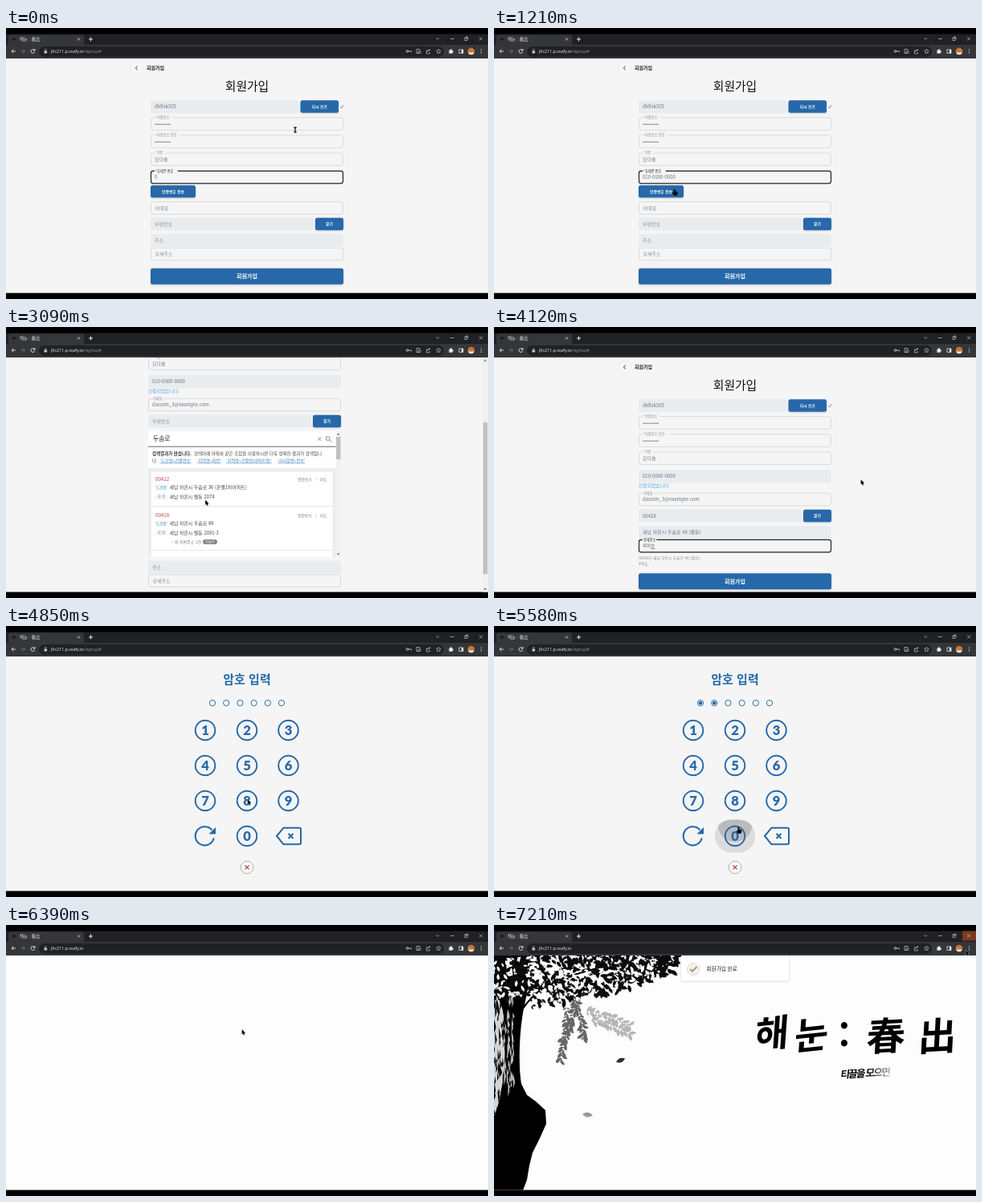
An HTML page that plays this animation: 600 by 338 pixels, repeating every 7.24 s.

```html
<!DOCTYPE html>
<html lang="ko">
<head>
<meta charset="utf-8">
<title>회원가입</title>
<style>
html, body { margin: 0; width: 100%; height: 100%; overflow: hidden; background: #000; }
svg { display: block; width: 100%; height: 100%; font-family: "Noto Sans CJK KR", "Noto Sans CJK", "Noto Sans", sans-serif; }
text { white-space: pre; }
.latin { font-family: "Noto Sans", sans-serif; }
.key { font-family: Lato, sans-serif; font-weight: 900; }
</style>
</head>
<body>
<svg id="stage" viewBox="0 0 600 338">
  <defs>
    <clipPath id="view"><rect y="38" width="600" height="292.5"/></clipPath>
    <clipPath id="listClip"><rect x="177" y="130" width="240" height="157"/></clipPath>
    <clipPath id="keyClip"><rect id="keyShape" width="50" height="41" rx="20"/></clipPath>
    <clipPath id="trunkClip"><path id="trunkShape"/></clipPath>
    <linearGradient id="titleInk" gradientUnits="userSpaceOnUse"><stop/><stop offset="1" stop-opacity="0"/></linearGradient>
    <linearGradient id="lineInk" gradientUnits="userSpaceOnUse"><stop/><stop offset="1" stop-opacity="0"/></linearGradient>
    <filter id="shadow" x="-10%" y="-30%" width="120%" height="170%"><feDropShadow dx="0" dy=".7" stdDeviation=".8" flood-opacity=".2"/></filter>
  </defs>
  <rect width="600" height="338"/>
  <g clip-path="url(#view)">
    <rect id="paper" y="37" width="600" height="295"/>
    <g id="page"></g>
    <g id="landing"></g>
  </g>
  <g id="chrome"></g>
  <g id="cursor"></g>
</svg>
<script>
const LOOP = 7240;
const BLUE = '#2568a9', INK = '#6d7378', PALE = '#8d9398';
const USER = {
  id: 'dkflsk305', name: '모다솔', phone: '010-0000-0000', mail: 'dasolm_3@example.com',
  zip: '00418', road: '두솜로', address: '새남 하온시 두솜로 48 (별동)'
};
const SITE = ['해', '눈', ':', '春', '出'];
const $ = id => document.getElementById(id);
const clamp = v => Math.max(0, Math.min(1, v));
const span = (t, a, b) => clamp((t - a) / (b - a));
const ease = p => p * p * (3 - 2 * p);
const typed = (s, t, a, b) => s.slice(0, Math.floor(span(t, a, b) * s.length));

const text = (x, y, s, size, fill = INK, more = '') =>
  `<text x="${x}" y="${y}" font-size="${size}" fill="${fill}" ${more}>${s}</text>`;
const box = (x, y, w, h, fill, r = 0, more = '') =>
  `<rect x="${x}" y="${y}" width="${w}" height="${h}" rx="${r}" fill="${fill}" ${more}/>`;
const line = (d, stroke, width = 1, more = '') =>
  `<path d="${d}" fill="none" stroke="${stroke}" stroke-width="${width}" ${more}/>`;
const disc = (x, y, r, fill, more = '') => `<circle cx="${x}" cy="${y}" r="${r}" fill="${fill}" ${more}/>`;
const MID = 'text-anchor="middle"', BOLD = 'font-weight="700"', MEDIUM = 'font-weight="500"', THIN = 'font-weight="300"';

const shown = {};
function paint(id, markup) {
  if (shown[id] !== markup) $(id).innerHTML = shown[id] = markup;
}

// ---- browser frame ----
function chrome(path, closing) {
  const grey = '#c4c7ca', white = '#e8eaed';
  return box(0, 7.5, 600, 14, '#202124')
    + '<path d="M1 21.5q2 0 2-2v-8q0-3 3-3h88q3 0 3 3v8q0 2 2 2z" fill="#35363a"/>'
    + box(0, 21, 600, 17, '#35363a')
    + box(8, 12.5, 4, 3, '#1b1b1d')
    + text(17, 16.2, `${SITE[0]}${SITE[1]} : ${SITE[3]}${SITE[4]}`, 5.4, white)
    + line('M89 12.5l3 3m0-3l-3 3', grey, .8) + line('M103 14h5m-2.5-2.5v5', white, 1)
    + (closing ? box(583, 7.5, 17, 12, '#7a3a20') : '')
    + line('M535.5 12.5l1.8 1.8 1.8-1.8M553 13.5h5M589 11.5l4 4m0-4l-4 4M571 12.5h3v3h-3zM572 12v-.8h3v3', grey, .7)
    + line('M12 29H7m2.3-2.3L7 29l2.3 2.3', white, .9)
    + line('M18.5 29h5m-2.3-2.3l2.3 2.3-2.3 2.3', '#74777b', .9)
    + line('M35.5 27.8a2.4 2.4 0 1 0 .2 2M36 26v2.2h-2.2', white, .9)
    + box(41, 23, 504, 13, '#202124', 6.5)
    + box(47.5, 28.5, 3.6, 3, grey, .5) + line('M48.2 28.5v-1a1.1 1.1 0 0 1 2.2 0v1', grey, .6)
    + text(56, 31.2, `j9c211.p.ssafy.io<tspan fill="#8d9297">${path}</tspan>`, 5.3, white, 'class="latin"')
    + disc(499.5, 29, 1.3, 'none', `stroke="${grey}"`) + line('M501 29h3.4v1.5', grey, .9)
    + line('M514 31.5h-3v-5h4v2M513 29h3v2.5h-3zM526 28h-2.5v4h4v-2m-2.5-.3q0-2.4 3-2.4m-1.2-1.2l1.2 1.2-1.2 1.2', grey, .7)
    + line('M538.5 26.3l.8 1.8 2 .2-1.5 1.4.4 2-1.7-1-1.7 1 .4-2-1.5-1.4 2-.2z', grey, .7)
    + box(551.5, 27.5, 4.3, 4.3, white, .6) + disc(554, 27.3, 1.1, white) + disc(556, 29.5, 1, white)
    + line('M564 27h5v4.4h-5z', white, .8) + box(567, 27, 2, 4.4, white)
    + disc(579, 29, 4.3, '#c7763a') + '<path d="M575 30.5a4.3 4.3 0 0 0 8 0z" fill="#eee5dc"/>'
    + [26.8, 29, 31.2].map(y => disc(591.5, y, .6, white)).join('');
}

// ---- sign-up form ----
const button = (x, y, w, h, label, size = 4.8) =>
  box(x, y, w, h, BLUE, 2.5, 'filter="url(#shadow)"')
  + text(x + w / 2, y + h / 2 + size * .36, label, size, '#fff', `${MID} ${BOLD}`);
const filled = (y, s, w = 240, fill = INK) =>
  box(180, y, w, 16, '#e9ecef', 2) + text(185, y + 10.2, s, 6, fill, THIN);

function field(y, label, value, focus) {
  const out = box(180.5, y, 239, 15.5, 'none', 2.5,
    `stroke="${focus ? '#222' : '#d0d3d6'}" stroke-width="${focus ? 1.2 : .8}"`);
  if (!value && !focus) return out + text(185.5, y + 10, label, 6, PALE, THIN);
  return out + box(185, y - 2, label.length * 3.8 + 2, 4, '#f5f5f5')
    + text(186, y + 1.3, label, 4.2, focus ? '#222' : PALE)
    + text(185, y + 10, value, 6, INK, THIN);
}

function result(y, zip, road, lot) {
  const tag = (ty, s) => box(185.5, ty - 5, 15.5, 6.5, '#fafafa', .5, 'stroke="#e4e6ea" stroke-width=".4"')
    + text(193.3, ty, s, 4.6, '#3f8fd0', MID);
  return text(186, y, zip, 6.2, '#b9404e')
    + text(363, y, '영문보기', 4.8, '#777') + line(`M386.5 ${y - 4}v4`, '#bbb', .5) + text(390.5, y, '지도', 4.8, '#777')
    + tag(y + 9.5, '도로명') + text(203.5, y + 10, road, 5.9, '#444')
    + tag(y + 21.3, '지 번') + text(203.5, y + 21.8, lot, 5.9, '#444');
}

function addressSearch(t) {
  const head = box(177, 130, 240, 157, '#fff') + text(183, 142, typed(USER.road, t, 2600, 2790), 7.8, '#222', MEDIUM)
    + line('M388 137.3l4.6 4.6m0-4.6l-4.6 4.6', '#666', .7)
    + disc(400.7, 139, 2.5, 'none', 'stroke="#444" stroke-width=".6"') + line('M402.6 141l2.4 2.4', '#444', .7)
    + box(177, 148.7, 234, .9, '#555');
  if (t < 2830) return head;
  const tips = [[191.5, "'도로명+건물번호'"], [238, "'지역명+지번'"], [274, "'지역명+건물명(아파트명)'"], [338, "'사서함명+번호'"]];
  return `<g clip-path="url(#listClip)">${head}`
    + text(182, 159.8, '검색결과가 많습니다.', 5.5, '#333', BOLD)
    + text(234, 159.8, '검색어에 아래와 같은 조합을 이용하시면 더욱 정확한 결과가 검색됩니', 5.5, '#444')
    + text(182, 168.6, '다.', 5.5, '#444')
    + tips.map(([x, s]) => text(x, 168.6, s, 5.2, '#3d7fbd', 'text-decoration="underline"')).join('')
    + box(177, 176, 234, 111, '#ececec') + box(181, 180.5, 225.5, 107, '#fff')
    + result(192, '00412', `새남 하온시 ${USER.road} 36 (온별1차아파트)`, '새남 하온시 별동 2074')
    + box(181, 223, 225.5, .7, '#ddd')
    + result(237, USER.zip, `새남 하온시 ${USER.road} 48`, '새남 하온시 별동 2081-3')
    + text(203.5, 269.7, '└ 외 지번주소 1건', 5, '#777')
    + box(245, 265, 18, 6, '#888', 3) + text(254, 269.5, '더보기', 4, '#fff', MID)
    + box(181, 278, 225.5, .7, '#ddd')
    + box(410.5, 130, 6.5, 157, '#f1f1f1') + box(411, 137, 5.5, 28, '#c1c1c1')
    + '<path d="M412 134.5l1.7-2 1.7 2zM412 282.5l1.7 2 1.7-2z" fill="#555"/></g>';
}

const DETAIL_STEPS = [[3800, '4'], [3890, '40'], [3980, '408'],
  [4050, '408<tspan text-decoration="underline">ㅎ</tspan>'],
  [4100, '408<tspan text-decoration="underline">호</tspan>'], [4280, '408호']];

function form(t) {
  const verified = t >= 1480, mailFocus = t >= 1620 && t < 2330;
  const searching = t >= 2480 && t < 3400, chosen = t >= 3400;
  const scroll = searching ? 118 * ease(span(t, 2560, 2780)) : 0;
  const phone = '0' + typed(USER.phone.slice(1), t, 30, 850);
  const mailY = verified ? 207 : 216.5;
  const zipY = mailY + (!verified ? 20 : mailFocus ? 30 : 20.5);
  const addressY = zipY + (searching ? 182 : 20.5);
  const detailY = addressY + 17.3;
  const detail = DETAIL_STEPS.reduce((s, [at, v]) => t >= at ? v : s, '');
  const dots = '•'.repeat(10);

  let out = disc(162.5, 50, 8, '#f7f7f7', 'stroke="#ebebeb" stroke-width=".7"')
    + line('M163.7 47.7l-2.4 2.3 2.4 2.3', '#222', 1)
    + text(175, 52.2, '회원가입', 6, '#222', BOLD)
    + text(300, 78.3, '회원가입', 14.8, '#111', MID)
    + filled(90, USER.id, 184) + button(366.5, 90.3, 47.5, 15.4, '다시 쓰기')
    + line('M416.2 98.3l1.3 1.7 2.6-4', BLUE, .7)
    + field(111.8, '*비밀번호', dots) + field(133.8, '*비밀번호 확인', dots)
    + field(156, '*이름', USER.name);
  out += verified
    ? filled(178, USER.phone) + text(180, 200, '인증되었습니다.', 5.8, '#4fa3dc')
    : field(178.3, '*휴대폰 번호', phone, true) + button(180, 196.3, 56, 15.2, '인증번호 전송');
  out += field(mailY + .3, '이메일', typed(USER.mail, t, 1660, 2000), mailFocus)
    + filled(zipY, chosen ? USER.zip : '우편번호', 203, chosen ? INK : PALE) + button(385, zipY + .3, 35, 15.4, '찾기')
    + filled(addressY, chosen ? USER.address : '주소', 240, chosen ? INK : PALE)
    + field(detailY, '상세주소', detail, t >= 3680 && t < 4400);
  if (chosen) out += text(180, detailY + 25, `[${USER.zip}] ${USER.address},`, 4.8, PALE)
    + text(180, detailY + 31.2, detail, 4.4, PALE);
  out += button(180, detailY + (chosen ? 42 : 25.5), 240, 20, '회원가입', 7);
  if (t >= 1700 && mailFocus) out += box(182, 223.3, 148, 9, '#f9f9f9', 1, 'stroke="#e6e6e6" stroke-width=".5"')
    + text(185, 229.7, USER.mail, 5.6, '#111');
  if (!searching) return out;
  return `<g transform="translate(-3 ${-scroll})">${out}<g transform="translate(3 118)">${addressSearch(t)}</g></g>`
    + box(593, 37, 7, 295, '#f1f1f1') + box(594, 43 + scroll * .645, 5.4, 189, '#c1c1c1')
    + '<path d="M594.8 42.5l1.7-2 1.7 2zM594.8 326l1.7 2 1.7-2z" fill="#555"/>';
}

// ---- passcode pad ----
const COLS = [248, 300, 351.5], ROWS = [130, 174, 218, 262];
// time, column, row
const PRESSES = [[5280, 2, 1], [5550, 1, 3], [5680, 1, 2], [5780, 0, 0], [5880, 2, 0], [5970, 1, 0]];

function keypad(t) {
  let out = text(300, 71.8, '암호 입력', 15, BLUE, `${MID} ${BOLD}`);
  const count = PRESSES.filter(p => t >= p[0]).length;
  for (let i = 0; i < 6; i++) {
    const x = 257 + i * 17.2;
    out += disc(x, 96, 3.6, '#fff', `stroke="${BLUE}" stroke-width="1"`) + (i < count ? disc(x, 96, 2.3, BLUE) : '');
  }
  const press = PRESSES.filter(p => t >= p[0] - 40 && t < p[0] + 170).pop();
  if (press) {
    const x = COLS[press[1]], y = ROWS[press[2]], age = t - press[0];
    $('keyShape').setAttribute('x', x - 25);
    $('keyShape').setAttribute('y', y - 20.5);
    out += box(x - 25, y - 20.5, 50, 41, '#dcdcdc', 20);
    if (age > 0) out += disc(x, y - 14, 15 + age * .2, '#000',
      `opacity="${.15 * (1 - span(age, 80, 170))}" clip-path="url(#keyClip)"`);
  }
  for (let n = 1; n <= 10; n++) {
    const x = n > 9 ? 300 : COLS[(n - 1) % 3], y = ROWS[Math.floor((n - 1) / 3)];
    out += disc(x, y, 12.3, 'none', `stroke="${BLUE}" stroke-width="1.9"`)
      + text(x, y + 5.8, n % 10, 16.5, BLUE, `${MID} class="key"`);
  }
  return out + line('M256.5 254.5a11.7 11.7 0 1 0 2.3 10', BLUE, 2)
    + `<path d="M252.5 259.5h8.5v-8.5z" fill="${BLUE}"/>`
    + line('M337 262l8.5-10.3h19.5q2 0 2 2v16.6q0 2-2 2h-19.5z', BLUE, 2, 'stroke-linejoin="round"')
    + line('M351.5 259l6 6m0-6l-6 6', BLUE, 2)
    + disc(300, 301, 7.8, '#f8f8f8', 'stroke="#aaa" stroke-width=".9"')
    + line('M297.5 298.5l5 5m0-5l-5 5', '#c0453a', 1.1);
}

// ---- landing page ----
let seed = 17;
const rnd = () => (seed = (seed * 16807) % 2147483647) / 2147483647;
const leaf = (x, y, a, s) => {
  const c = Math.cos(a) * s, d = Math.sin(a) * s;
  const at = (u, v) => `${(x + u * c - v * d).toFixed(1)} ${(y + u * d + v * c).toFixed(1)}`;
  return `M${at(0, 0)}Q${at(.5, .45)} ${at(1, 0)}Q${at(.5, -.45)} ${at(0, 0)}`;
};

function spray(x, y, angle, length, bend) {
  let d = '';
  for (let i = 0; i < length; i += 3.5) {
    x += Math.cos(angle) * 3.5;
    y += Math.sin(angle) * 3.5;
    angle += bend;
    for (const side of [-1, 1]) d += leaf(x, y, angle + side * (.4 + rnd() * .8), 4 + rnd() * 6);
  }
  return d;
}

// leaves scattered under a canopy edge that rises towards the right
function scatter(count, reach, falloff, size) {
  let d = '';
  for (let i = 0; i < count; i++) {
    const x = reach * Math.pow(rnd(), 1.2);
    const depth = 76 * Math.pow(1 - x / 240, .5) * (x < 45 ? .75 : 1);
    d += leaf(x, 34 + depth * Math.pow(rnd(), falloff), rnd() * 2.6 - .3, size * (.6 + rnd() * .8));
  }
  return d;
}

// short vertical slivers for the bark
function slivers(count, left, width, top, height) {
  let d = '';
  for (let i = 0; i < count; i++) {
    const x = left + rnd() * width, y = top + rnd() * height, h = 4 + rnd() * 9;
    d += `M${x.toFixed(1)} ${y.toFixed(1)}l${(1 + rnd() * 2).toFixed(1)} ${h.toFixed(1)}l-2 ${(h * .6).toFixed(1)}z`;
  }
  return d;
}

function tree() {
  const trunk = 'M0 38H40L42 78Q40 92 37 104Q33 125 32 150Q31 180 34 198L41 212L52 220L64 231L65 248L57 266L48 284L44 300L41 318L36 331H0Z';
  $('trunkShape').setAttribute('d', trunk);
  const hanging = spray(104, 95, 1.9, 74, -.004) + spray(90, 100, 1.5, 45, .03) + spray(98, 90, 1.1, 50, .03);
  const faint = spray(112, 108, .1, 58, .025) + spray(118, 118, .2, 50, .02);
  return `<path d="${trunk}"/><g clip-path="url(#trunkClip)">`
    + '<path d="M0 84Q15 100 13 140Q15 180 9 205Q6 226 0 238Z" fill="#d4d4d4"/>'
    + `<path d="${slivers(55, -2, 16, 80, 150)}"/><path d="${slivers(45, 12, 12, 70, 130)}" fill="#bbb"/></g>`
    + line('M36 104Q56 76 84 67T150 48M70 71Q60 55 46 38M96 62Q118 70 138 82', '#000', 2.2)
    + `<path d="${scatter(760, 225, 1.1, 8)}" fill="#0c0c0c"/><path d="${scatter(230, 200, .9, 6)}" fill="#fdfdfe"/>`
    + `<path d="${hanging}" fill="#666"/><path d="${faint}" fill="#b5b5b5"/>`;
}

function buildLanding() {
  // centre, baseline, size, tilt, slant
  const glyphs = [[345, 152, 46, -6, -10], [394, 154, 46, -6, -10], [436, 154, 44, 0, 0], [487, 156, 48, -3, -6], [551, 156, 48, -3, -6]];
  const title = SITE.map((s, i) => {
    const [x, y, size, tilt, slant] = glyphs[i];
    return `<g transform="translate(${x} ${y}) rotate(${tilt}) skewX(${slant})">${text(0, 0, s, size, 'url(#titleInk)', `${MID} ${BOLD}`)}</g>`;
  });
  // each glyph has its own local space, so the shared gradient is driven per glyph
  const inks = SITE.map((s, i) => `<linearGradient id="ink${i}" href="#titleInk" gradientUnits="userSpaceOnUse"/>`).join('');
  $('landing').innerHTML = `<defs>${inks}</defs><g id="tree">${tree()}</g><path id="leafA" d="${leaf(-6, 2, -.4, 12)}" fill="#333"/>`
    + `<path id="leafB" d="${leaf(-7, 0, .1, 13)}" fill="#999"/>${title.map((g, i) => g.replace('titleInk', 'ink' + i)).join('')}`
    + `<g transform="translate(431 191) rotate(-3) skewX(-10)">${text(0, 0, '티끌을 모으면', 12.5, 'url(#lineInk)', `${BOLD} letter-spacing="-1.7"`)}</g>`
    + '<g id="toast">' + box(233, 37, 134, 32.5, '#fff', 2, 'filter="url(#shadow)"')
    + disc(248, 55, 7.5, '#f4f2ec', 'stroke="#d5d2ca" stroke-width=".8"') + line('M244 55l3 3 5.5-6', '#a29a72', 1.9)
    + text(264.5, 57.2, '회원가입 완료', 6.6, '#222', MEDIUM) + '</g>';
  return glyphs.map(g => g[0]);
}

function wipe(id, from, to) {
  $(id).setAttribute('x1', from);
  $(id).setAttribute('x2', to);
}

function landing(t) {
  $('landing').style.display = t >= 6500 ? '' : 'none';
  if (t < 6500) return;
  $('tree').setAttribute('opacity', ease(span(t, 6500, 6650)));
  const drift = (t - 7210) / 1000;
  $('leafA').setAttribute('transform', `translate(${158 + drift * 18} ${169 + drift * 70}) rotate(${drift * 60})`);
  $('leafB').setAttribute('transform', `translate(${117 + drift * 14} ${236 + drift * 60}) rotate(${drift * 40})`);
  const titleX = 300 + 340 * span(t, 6600, 7020);
  glyphX.forEach((x, i) => wipe('ink' + i, titleX - 40 - x, titleX - x));
  const tagX = (t - 7210) * .2 + 70;
  wipe('lineInk', tagX - 36, tagX);
  $('toast').setAttribute('transform', `translate(0 ${-36 * (1 - ease(span(t, 6540, 6680)))})`);
}

// ---- pointer ----
const PATH = [[0, 360, 127], [850, 360, 127], [1250, 220, 205], [1480, 220, 205], [1640, 300, 215], [2000, 357, 227],
  [2260, 357, 227], [2440, 401, 236], [2510, 401, 236], [2720, 300, 160], [2850, 290, 170], [3050, 248, 215.5], [3150, 248, 215.5],
  [3300, 240, 246], [3420, 240, 246], [3640, 300, 272], [3900, 456.5, 190], [4150, 456.5, 190], [4300, 310, 316],
  [4560, 310, 316], [4900, 300, 210], [5260, 354, 174], [5330, 354, 174], [5530, 303.5, 253], [5590, 303.5, 253],
  [5670, 302, 218], [5770, 250, 131], [5870, 351, 131], [5960, 293.5, 130], [6560, 293.5, 130], [7040, 590, 13], [7190, 587, 31], [LOOP, 587, 31]];
const BEAM_TIMES = [[0, 1000], [1600, 1750], [3600, 3700]];
const HAND_TIMES = [[1200, 1500], [2410, 2530], [4280, 4620], [5200, 6040]];

function pointer(t) {
  const i = Math.max(1, PATH.findIndex(p => p[0] > t));
  const [a, b] = [PATH[i - 1], PATH[i]], p = ease(span(t, a[0], b[0]));
  const x = a[1] + (b[1] - a[1]) * p, y = a[2] + (b[2] - a[2]) * p;
  const during = times => times.some(([from, to]) => t >= from && t < to);
  const shape = during(BEAM_TIMES) ? line('M-1.7-2.8H1.7M0-2.8V2.8M-1.7 2.8H1.7', '#000', 1.2)
    : during(HAND_TIMES) ? '<path d="M0-2q1.2-.7 1.6.6l.3 1.9 2.3.8q1 .6.6 2l-.8 2.7H.5l-2.3-2.8q-.3-1 .8-.9l.9.5z"/>'
    : '<path d="M0 0v6.7l1.5-1.2 1 2.2 1.4-.6-.9-2.1 1.9-.2z" stroke="#fff" stroke-width=".3"/>';
  return `<g transform="translate(${x.toFixed(2)} ${y.toFixed(2)})">${shape}</g>`;
}

const KEYPAD_AT = 4640, DONE_AT = 6040;
function draw(t) {
  $('paper').setAttribute('fill', t < DONE_AT ? '#f5f5f5' : '#fdfdfe');
  paint('page', t < KEYPAD_AT ? form(t) : t < DONE_AT ? keypad(t) : '');
  landing(t);
  paint('chrome', chrome(t < DONE_AT ? '/signup#' : '', t > 7020));
  paint('cursor', pointer(t));
}

const glyphX = buildLanding();
const start = performance.now();
function tick() {
  draw((performance.now() - start) % LOOP);
  requestAnimationFrame(tick);
}
tick();
</script>
</body>
</html>
```
